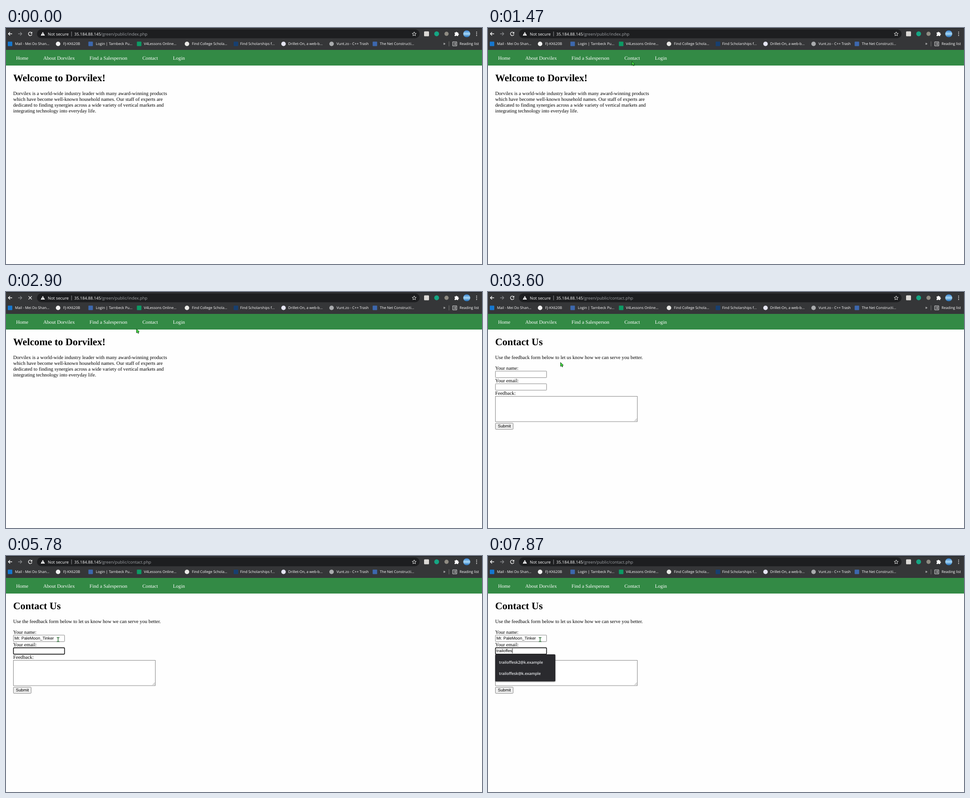
Write an HTML page that moves like this. It is 1060 by 528 pixels and loops after 8 s.

```html
<!DOCTYPE html>
<html lang="en">
<head>
<meta charset="utf-8">
<title>Contact form demo</title>
<style>
  html, body { margin: 0; width: 100%; height: 100%; overflow: hidden; background: #fff; }
  svg { display: block; width: 1060px; height: 528px; }
  text { white-space: pre; text-rendering: geometricPrecision; }
  .ui { font-family: "Open Sans", "Noto Sans", sans-serif; font-size: 9.25px; fill: #fff; }
  .mark { font-size: 8.05px; }
  .page { font-family: "Liberation Serif", serif; font-size: 11.15px; fill: #000; }
  .nav { fill: #fff; }
  .title { font-size: 22.3px; font-weight: bold; }
  .field { font-family: "Liberation Sans", sans-serif; font-size: 9.29px; fill: #000; }
  .hint { font-size: 8.65px; font-weight: 600; fill: #e8eaed; }
  .line { fill: none; stroke: #fff; stroke-width: 1.3; }
  .box { fill: #fff; stroke: #767676; stroke-width: .9; }
  .focus { fill: none; stroke: #101010; stroke-width: 1.6; }
</style>
</head>
<body>
<svg viewBox="0 0 1060 528">
  <defs>
    <linearGradient id="sky" x2="0" y2="1">
      <stop offset="0" stop-color="#2f7fd0"/><stop offset=".5" stop-color="#a9d8f5"/><stop offset="1" stop-color="#1769b8"/>
    </linearGradient>
    <filter id="shade" x="-10%" y="-10%" width="120%" height="125%">
      <feDropShadow dx="0" dy="1" stdDeviation="1.2" flood-opacity=".45"/>
    </filter>
  </defs>
  <rect width="1060" height="528" fill="#fefefe"/>

  <!-- browser bar -->
  <rect width="1060" height="49" fill="#353638"/>
  <rect width="1060" height="1" fill="#1d1e20"/>
  <rect x="69" y="3" width="852" height="20" rx="10" fill="#1d1e20"/>
  <path class="line" d="M13.5 13H5.5M9 9.2L5.2 13L9 16.8"/>
  <path class="line" style="stroke:#85878a" d="M27 13H35M31.5 9.2L35.3 13L31.5 16.8"/>
  <g id="reload">
    <path class="line" d="M57 10.4A4 4 0 1 0 57.8 14.3"/>
    <path d="M58.4 8.6V12.6H54.4Z" fill="#fff"/>
  </g>
  <path id="stop" class="line" d="M50.2 9.4L57.4 16.6M57.4 9.4L50.2 16.6"/>
  <path d="M82 8.8L86.6 17H77.4Z" fill="#fff"/>
  <path d="M82 11.8V14M82 14.8V16" stroke="#1d1e20"/>
  <text class="ui" x="93" y="16.5">Not secure</text>
  <path d="M146 8V18.5" stroke="#9a9c9f"/>
  <text class="ui" x="152" y="16.5" style="font-size:9.08px">35.184.88.145</text>
  <text class="ui" id="path" x="211" y="16.5" style="fill:#a0a3a7"></text>
  <path class="line" style="stroke-width:.9" d="M909 8.8L910.3 11.8L913.5 12.1L911.1 14.2L911.8 17.3L909 15.7L906.2 17.3L906.9 14.2L904.5 12.1L907.7 11.8Z"/>
  <rect x="931" y="7.5" width="11" height="11" rx="1.5" fill="#dcdad7"/>
  <circle cx="959" cy="13" r="5.4" fill="#15a683"/>
  <circle cx="981" cy="13" r="4.7" fill="#8f8c83"/>
  <path d="M999 10H1001.4A1.6 1.6 0 0 1 1004.6 10H1007V12.4A1.6 1.6 0 0 1 1007 15.6V18H1004.3A1.4 1.4 0 0 0 1001.6 18H999V15.3A1.4 1.4 0 0 0 999 12.6Z" fill="#fff"/>
  <circle cx="1026" cy="13" r="7.8" fill="url(#sky)"/>
  <g fill="#fff"><circle cx="1048" cy="9.3" r="1"/><circle cx="1048" cy="13" r="1"/><circle cx="1048" cy="16.7" r="1"/></g>

  <g id="marks"></g>
  <text class="ui mark" x="973.5" y="38" style="font-size:10px">»</text>
  <path d="M986.5 30V41" stroke="#777"/>
  <path class="line" style="stroke-width:.9" d="M994.8 31H1003.8V40H994.8ZM997 33.5H998M999 33.5H1002M997 35.5H998M999 35.5H1002M997 37.5H998M999 37.5H1002"/>
  <text class="ui mark" x="1010" y="38.4">Reading list</text>

  <!-- page -->
  <rect y="49" width="1060" height="35" fill="#338a45"/>
  <g id="nav"></g>
  <g id="home" class="page">
    <text class="title" x="16" y="119">Welcome to Dorvilex!</text>
    <text x="16" y="150">Dorvilex is a world-wide industry leader with many award-winning products</text>
    <text x="16" y="163">which have become well-known household names. Our staff of experts are</text>
    <text x="16" y="175.8">dedicated to finding synergies across a wide variety of vertical markets and</text>
    <text x="16" y="188.5">integrating technology into everyday life.</text>
  </g>
  <g id="contact" class="page">
    <text class="title" x="16" y="119">Contact Us</text>
    <text x="16" y="150">Use the feedback form below to let us know how we can serve you better.</text>
    <text x="16" y="174">Your name:</text>
    <text x="16" y="202">Your email:</text>
    <text x="16" y="230">Feedback:</text>
    <rect class="box" x="16.5" y="177" width="114" height="14.6" rx="1"/>
    <rect class="box" x="16.5" y="205.3" width="114" height="14.4" rx="1"/>
    <rect class="box" x="16.5" y="233.4" width="316" height="56.6"/>
    <path d="M326.5 288.5L331.5 283.5M329.5 288.5L331.5 286.5" stroke="#777" stroke-width=".8"/>
    <rect class="box" x="16.5" y="293.3" width="39.5" height="14" rx="1.5" style="fill:#efefef"/>
    <text class="field" x="22" y="303.3">Submit</text>
    <rect id="focus" class="focus" x="16.6" width="113.8" height="14.2" rx="1.5"/>
    <text id="name" class="field" x="18.8" y="187.3">Mr. PaleMoon_Tinker</text>
    <path id="spell" d="M34.8 188.6H107.6" stroke="#f33" stroke-width="1"/>
    <text id="email" class="field" x="18.8" y="215.3"></text>
    <rect id="caret" width=".9" height="10.6" fill="#000"/>
    <g id="popup">
      <rect id="panel" x="16" y="220" width="134" rx="2" fill="#292a2d" filter="url(#shade)"/>
      <text class="ui hint" x="24.5" y="241.2">trailoffesk2@k.example</text>
      <text class="ui hint" x="24.5" y="266.2">trailoffesk@k.example</text>
    </g>
  </g>
  <path id="arrow" d="M.5 .5V9.6L2.6 7.7L4.1 10.8L5.7 10L4.3 7H7Z" fill="#3fe03f" stroke="#123d16" stroke-width=".9"/>
  <path id="beam" d="M-3 -4.6H-.7L0 -4L.7 -4.6H3M0 -4V4M-3 4.6H-.7L0 4L.7 4.6H3" fill="none" stroke="#2c6b35" stroke-width="1.5"/>
</svg>
<script>
const LOOP = 8000;
const $ = id => document.getElementById(id);
const show = (id, on) => { $(id).style.display = on ? '' : 'none'; };

// label, text x, icon x, icon colour, round icon
const bookmarks = [
  ['Mail - Mei Do Shan...', 20, 9, '#1677cf'],
  ['FJ-KX620B', 127.5, 116, '#f1f1f1', true],
  ['Login | Tarnbeck Pu...', 200, 188.5, '#3d68ae'],
  ['V4Lessons Online...', 307, 296.5, '#0c9a64'],
  ['Find College Schola...', 414, 403, '#e9e9e6', true],
  ['Find Scholarships f...', 521.5, 512, '#173f70'],
  ['Drillet-On, a web-b...', 628.5, 618, '#e4e4f2', true],
  ['Vunt.zo - C++ Trash', 736, 725, '#a9abad', true],
  ['The Net Constructi...', 832.5, 821.5, '#3d68ae'],
];
$('marks').innerHTML = bookmarks.map(([label, x, icon, color, round]) =>
  `<rect x="${icon - 5}" y="30.5" width="10" height="10" rx="${round ? 5 : 1}" fill="${color}"/>
   <text class="ui mark" x="${x}" y="38.4">${label}</text>`).join('');

const links = [['Home', 22.5], ['About Dorvilex', 83], ['Find a Salesperson', 186], ['Contact', 303.7], ['Login', 371.7]];
$('nav').innerHTML = links.map(([label, x]) =>
  `<text class="page nav" x="${x}" y="71">${label}</text>`).join('');

// pointer steps: time, x, y
const pointer = [
  [70, 915, 472], [130, 724, 391], [420, 640, 345], [500, 480, 258], [590, 366, 196],
  [830, 357, 180], [910, 345, 150], [990, 335, 120], [1070, 326, 95], [1150, 321, 82],
  [1300, 321, 79], [1390, 320, 76], [1470, 320, 74], [1690, 319, 72], [1770, 319, 71],
  [2160, 319, 72], [2330, 318, 73], [2720, 310, 75], [2800, 298, 79], [2900, 290, 82],
  [2980, 280, 90], [3060, 266, 99], [3140, 250, 108], [3220, 235, 117], [3300, 219, 124],
  [3380, 205, 131], [3520, 187, 137], [3600, 161, 157], [3680, 149, 164], [3760, 139, 169],
  [3840, 133, 171], [4310, 124, 177], [4390, 116, 187],
];
const typed = [
  [0, 0], [6490, 1], [6630, 2], [6800, 3], [7020, 4], [7190, 5],
  [7270, 6], [7500, 7], [7590, 8], [7740, 9], [7870, 10],
];
const user = 'trailoffesk';
const LOADING = 2080, LOADED = 2980, BEAM = 4390, FOCUS = 4550, PASTE = 4770, NEXT = 5240, POPUP = 6580;

const stepAt = (steps, t) => steps.findLast(step => step[0] <= t);

function draw(t) {
  const loaded = t >= LOADED, onEmail = t >= NEXT;
  show('home', !loaded);
  show('contact', loaded);
  $('path').textContent = `/green/public/${loaded ? 'contact' : 'index'}.php`;
  const loading = t >= LOADING && !loaded;
  show('stop', loading);
  show('reload', !loading);

  const spot = stepAt(pointer, t);
  show('arrow', spot && t < BEAM);
  show('beam', t >= BEAM);
  if (spot) {
    const move = `translate(${spot[1]} ${spot[2]})`;
    $('arrow').setAttribute('transform', move);
    $('beam').setAttribute('transform', move);
  }

  show('focus', t >= FOCUS);
  $('focus').setAttribute('y', onEmail ? 205.4 : 177.2);
  show('name', t >= PASTE);
  show('spell', t >= PASTE && !onEmail);
  $('email').textContent = user.slice(0, stepAt(typed, t)[1]);
  show('popup', t >= POPUP);
  $('panel').setAttribute('height', t < 6630 ? 61.5 : 60.5);

  const blinkedOff = t >= 5780 && t < 6340;
  show('caret', t >= FOCUS && !blinkedOff);
  if (t >= FOCUS) {
    const text = t < PASTE ? '' : onEmail ? $('email').textContent : $('name').textContent;
    const width = text ? $(onEmail ? 'email' : 'name').getComputedTextLength() : 0;
    $('caret').setAttribute('x', 18.9 + width);
    $('caret').setAttribute('y', onEmail ? 207 : 179);
  }
}

const start = performance.now();
function tick() {
  draw((performance.now() - start) % LOOP);
  requestAnimationFrame(tick);
}
tick();
</script>
</body>
</html>
```
